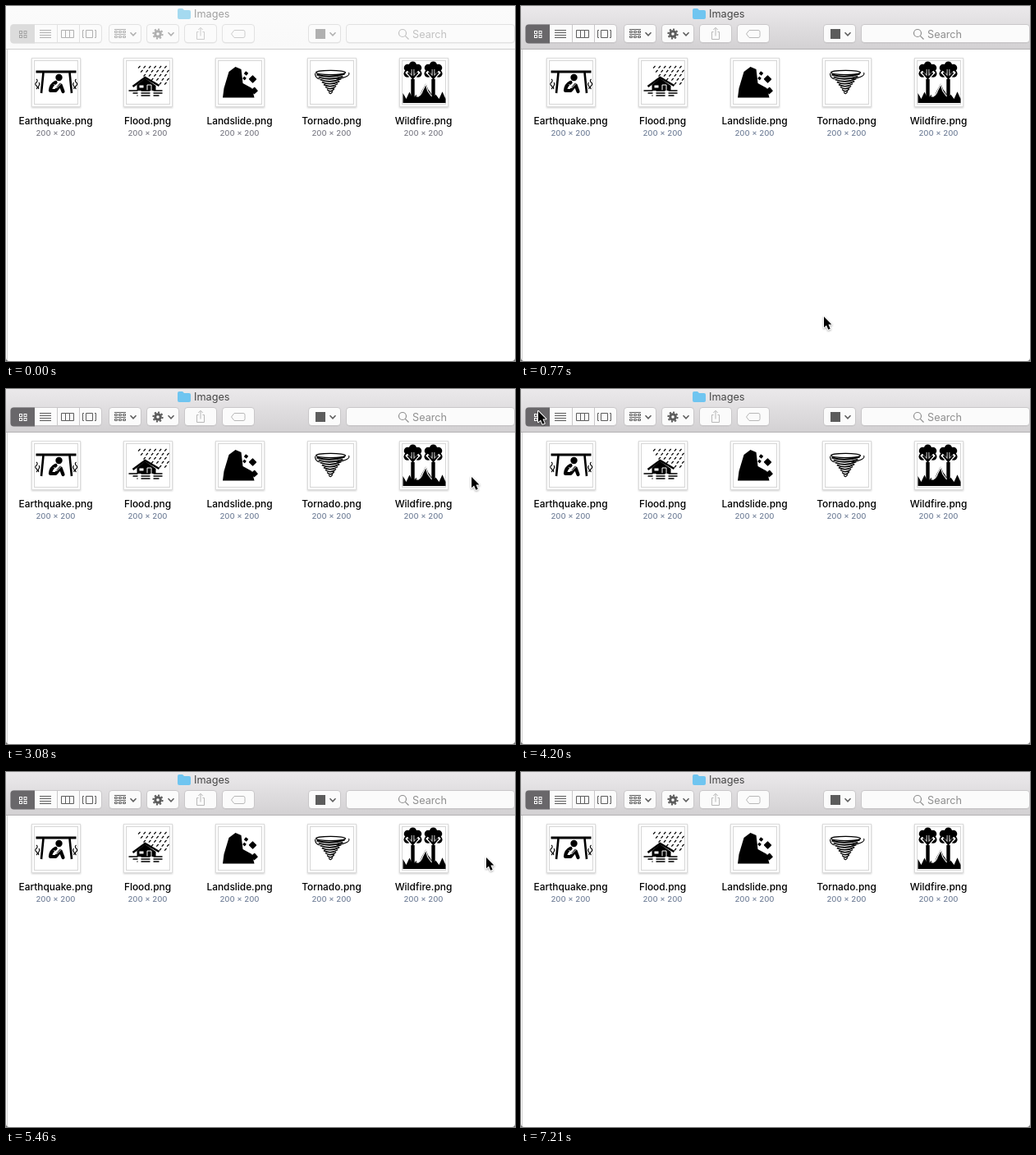
Recreate the animation shown at these times as an HTML page. Size 620 by 432 pixels, loop 7490 ms.

```html
<!DOCTYPE html>
<html lang="en">
<head>
<meta charset="utf-8">
<title>Images</title>
<style>
html, body { margin: 0; width: 100%; height: 100%; overflow: hidden; background: #fff }
svg { display: block; font-family: Inter, Roboto, sans-serif;
  --top: #ebe9eb; --low: #d3d1d3; --rule: #b4b2b4; --face: #fbfbfb; --edge: #c9c7c9; --sel: #69676a;
  --mark: #fff; --ink: #5c5c5c; --faint: #b8b8b8; --title: #464646; --hint: #8f8f8f; --size: #76849c; --folder: #6fc5f0 }
svg.idle { --top: #fbfbfb; --low: #f9f9f9; --rule: #cfcfcf; --face: #fbfbfb; --edge: #e2e2e2; --sel: #dcdcdc;
  --mark: #a3a3a3; --ink: #b0b0b0; --faint: #cdcdcd; --title: #a0a0a0; --hint: #c2c2c2; --size: #80808a; --folder: #a5daf0 }
.face { fill: var(--face); stroke: var(--edge) }
.line { fill: none; stroke: var(--ink) }
.faint { fill: none; stroke: var(--faint) }
.pen { fill: none; stroke: #000 }
.white { fill: none; stroke: #fff }
</style>
</head>
<body>
<svg id="stage" width="620" height="432" viewBox="0 0 620 432">
  <defs>
    <linearGradient id="bar" x2="0" y2="1">
      <stop style="stop-color:var(--top)"/><stop offset="1" style="stop-color:var(--low)"/>
    </linearGradient>
  </defs>

  <rect width="620" height="52" fill="url(#bar)"/>
  <path d="M0 52.5H620" style="stroke:var(--rule)"/>
  <path d="M1.5 53V432" stroke="#d4d4d4"/>
  <path d="M0 428Q0 432 4 432H0ZM620 428Q620 432 616 432H620Z" fill="#777"/>

  <path d="M209 5Q209 3 211 3H215L217 5H223Q225 5 225 7V14Q225 16 223 16H211Q209 16 209 14Z" style="fill:var(--folder)"/>
  <text x="229" y="14" font-size="12.7" style="fill:var(--title)">Images</text>

  <g id="buttons"></g>
  <path d="M35 22.5H9.500Q5.500 22.500 5.500 26.500V41.500Q5.500 45.500 9.500 45.500H35Z" style="fill:var(--sel)"/>
  <path d="M62.500 23V45M89.500 23V45" style="stroke:var(--edge)"/>
  <g id="icons"></g>
  <path d="M101 29.500H97.500V38.500H105.500V29.500ZM95 29.500H93.500V38.500H95M108 29.500H109.500V38.500H108" class="line"/>
  <g class="line">
    <circle cx="185" cy="34" r="3.3" stroke-width="3"/>
    <circle cx="185" cy="34" r="5.6" stroke-width="2" pathLength="16" stroke-dasharray="1"/>
  </g>
  <g class="faint">
    <path d="M234.500 31.500H232.500V40.500H241.500V31.500H239.500M237 36.500V26.500M234.300 29L237 26.300L239.700 29"/>
    <path d="M274.500 34L278 29.500H289Q291 29.500 291 31.500V36.500Q291 38.500 289 38.500H278Z"/>
  </g>
  <rect x="377" y="28" width="12" height="12" style="fill:var(--ink)"/>
  <g fill="none" stroke-width="1.2" style="stroke:var(--hint)">
    <circle cx="483" cy="33" r="4.500"/><path d="M486.300 36.300L490.500 40.500"/>
  </g>
  <text x="495" y="38.600" font-size="12.7" style="fill:var(--hint)">Search</text>

  <g id="files"></g>

  <path id="cursor" d="M0 0V13.200L3 10.400L5.300 15.800L7.700 14.800L5.400 9.500H9.400Z" stroke="#fff" stroke-width="2" stroke-linejoin="round" style="paint-order:stroke;filter:drop-shadow(0 1px 1px #0005)"/>
</svg>
<script>
const LOOP = 7490, STEP = 70, ACTIVATE = 630;
const $ = id => document.getElementById(id);
const row = (n, draw) => Array.from({ length: n }, (_, i) => draw(i)).join('');
const pen = (d, width, more = '') => `<path d="${d}" class="pen" stroke-width="${width}" ${more}/>`;
const white = (d, width) => `<path d="${d}" class="white" stroke-width="${width}"/>`;
const line = d => `<path d="${d}" class="line"/>`;

const button = (x, w) => `<rect x="${x - .5}" y="23.5" width="${w + 1}" height="22" rx="4" opacity=".09"/>
  <rect class="face" x="${x - .5}" y="22.5" width="${w + 1}" height="22" rx="3.5"/>`;
$('buttons').innerHTML = button(6, 110) + row(4, i => button(126 + 46 * i, 38)) + button(369, 38) + button(415, 204);

$('icons').innerHTML =
  row(4, i => `<rect x="${16.5 + i % 2 * 5.5}" y="${30.5 + (i >> 1) * 5}" width="3" height="3" fill="none" style="stroke:var(--mark)"/>`)
  + row(4, i => line(`M41 ${29.5 + 3 * i}h14`))
  + row(3, i => line(`M${67.5 + 5 * i} 29.5h5v9h-5z`))
  + row(6, i => line(`M${132.5 + i % 3 * 5} ${i < 3 ? 30.5 : 36.5}h3v2h-3z`))
  + row(2, i => line(`M132 ${28.5 + 6 * i}h14`))
  + [155, 201, 398].map(x => `<path d="M${x - 3.5} 32.2l3.5 3.6l3.5 -3.6" class="line" stroke-width="1.5"/>`).join('');

// Pictures are drawn around the centre of their thumbnail
function earthquake() {
  const shake = pen('M-23.5 -4q2.4 2 0 4t0 4t0 4M-20.5 0q1.6 2 0 4t0 4', 1.1);
  return pen('M-24 -13H25', 3) + pen('M-15 -12L-17.500 13M17 -12L19.500 13', 2.6)
    + shake + `<g transform="translate(1.5) scale(-1 1)">${shake}</g>`
    + '<circle cx="4" cy="-6" r="4.2"/>'
    + pen('M0 0Q-6 3 -6.500 10H0L6 3L9 11', 4.2, 'stroke-linejoin="round" stroke-linecap="round"')
    + white('M-2 2L1 7L7 1', .9);
}

function flood() {
  const rain = row(30, i => {
    const r = i / 6 | 0, x = -9 + i % 6 * 6.4 + r % 2 * 3, y = -20 + r * 5;
    return y < x * .65 - 8 ? `M${x} ${y}l-2.4 2.6` : '';
  });
  return pen(rain, 1.2) + pen('M-18 5L-3 -6L14 4', 2.6)
    + '<path d="M-13 3L-3 -5L10 4V10H-13Z"/>'
    + white('M-10 5H-5', 3) + white('M-.5 10V3H4.500V10', 1)
    + row(3, i => pen(`M${-23 + 5 * i} ${10 + 3 * i}H${22 - 4 * i}`, 1.4, `stroke-dasharray="11 4" stroke-dashoffset="${5 * i}"`));
}

function landslide() {
  const rocks = [[8, -11, 4], [16, -4, 7], [18, 10, 6.5], [6, -5, 3.5]];
  return '<path d="M-20.500 18.500L-19 7L-13 -13L-5 -19L2 -16L4 1L15 7L18 18.500Z"/>'
    + rocks.map(([x, y, s]) => `<rect x="${-s / 2}" y="${-s / 2}" width="${s}" height="${s}" rx=".8" transform="translate(${x} ${y}) rotate(${30 + x})"/>`).join('');
}

function tornado() {
  return '<ellipse cx="-1" cy="-12" rx="18" ry="2.6" class="pen" stroke-width="1.2"/>'
    + row(8, i => {
      const w = 17 - 2.1 * i;
      return pen(`M${-1 - w} ${-9.5 + 3 * i}q${w} 5 ${2 * w} -1`, 1.9 - .1 * i);
    })
    + pen('M6 -4Q24 -7 21 -12M-20 -11Q-20 -5 -14 -4', 1.1);
}

function wildfire() {
  const tree = x => `<g transform="translate(${x} -16)">`
    + row(5, i => {
      const a = Math.PI * (.85 + i * .325);
      return `<circle cx="${7.2 * Math.cos(a)}" cy="${7 * Math.sin(a) + 2}" r="4.6"/>`;
    })
    + '<circle r="5"/>' + white('M0 14V0M0 11L-8 3M0 11L8 3', 3.6)
    + pen('M0 38V0M0 11L-6 4M0 11L6 4', 2) + pen('M0 12V38', 4.4) + '</g>';
  const flames = row(14, i => `L${-25 + 4 * i} ${i % 2 ? 20 : 13 + 2 * Math.sin(i * 2)}`);
  return tree(-13) + tree(12)
    + `<path d="M-25 25${flames}V25Z"/><path d="M-10 22Q-4 16 -2 10L3 1L6 9Q10 12 11 22Z"/>`
    + white('M-9 17Q-3 17 -1 10L3 2L5 10L10 17', 1.1);
}

$('files').innerHTML = [earthquake, flood, landslide, tornado, wildfire].map((art, i) =>
  `<g transform="translate(${60.5 + 112 * i})" text-anchor="middle">
    <rect x="-29" y="63.5" width="59" height="59" fill="#fff" stroke="#dcdcdc" style="filter:drop-shadow(0 1px 1px #0003)"/>
    <rect x="-26" y="66.5" width="53" height="53" fill="none" stroke="#d6d6d6"/>
    <g transform="translate(0 93)">${art()}</g>
    <text y="144" font-size="11.9" font-weight="500">${art.name[0].toUpperCase() + art.name.slice(1)}.png</text>
    <text y="158" font-size="9.6" font-weight="500" style="fill:var(--size)">200 × 200</text>
  </g>`).join('');

// Pointer moves: start, end, then the place reached
const entry = [316, 440];
const moves = [
  [280, 490, 369, 378], [2030, 2380, 508, 202], [2520, 2800, 581, 122], [3010, 3290, 492, 26],
  [3430, 3640, 184, 3], [3780, 4200, 21, 27], [4200, 4550, 76, 194], [4550, 4690, 134, 196],
  [4900, 5110, 504, 148], [5250, 5460, 585, 104], [5460, 5810, 601, 37],
  [6230, 6440, 554, 170], [6440, 6580, 467, 341], [6720, 7210, 300, 440]
];

function pointer(t) {
  let [x, y] = entry;
  for (const [start, end, toX, toY] of moves) {
    const u = Math.min(1, Math.max(0, (t - start) / (end - start))), ease = u * u * (3 - 2 * u);
    x += (toX - x) * ease;
    y += (toY - y) * ease;
  }
  return [x, y];
}

function frame() {
  const t = Math.floor(performance.now() % LOOP / STEP) * STEP;
  $('stage').classList.toggle('idle', t < ACTIVATE);
  $('cursor').setAttribute('transform', `translate(${pointer(t)})`);
  requestAnimationFrame(frame);
}
frame();
</script>
</body>
</html>
```
